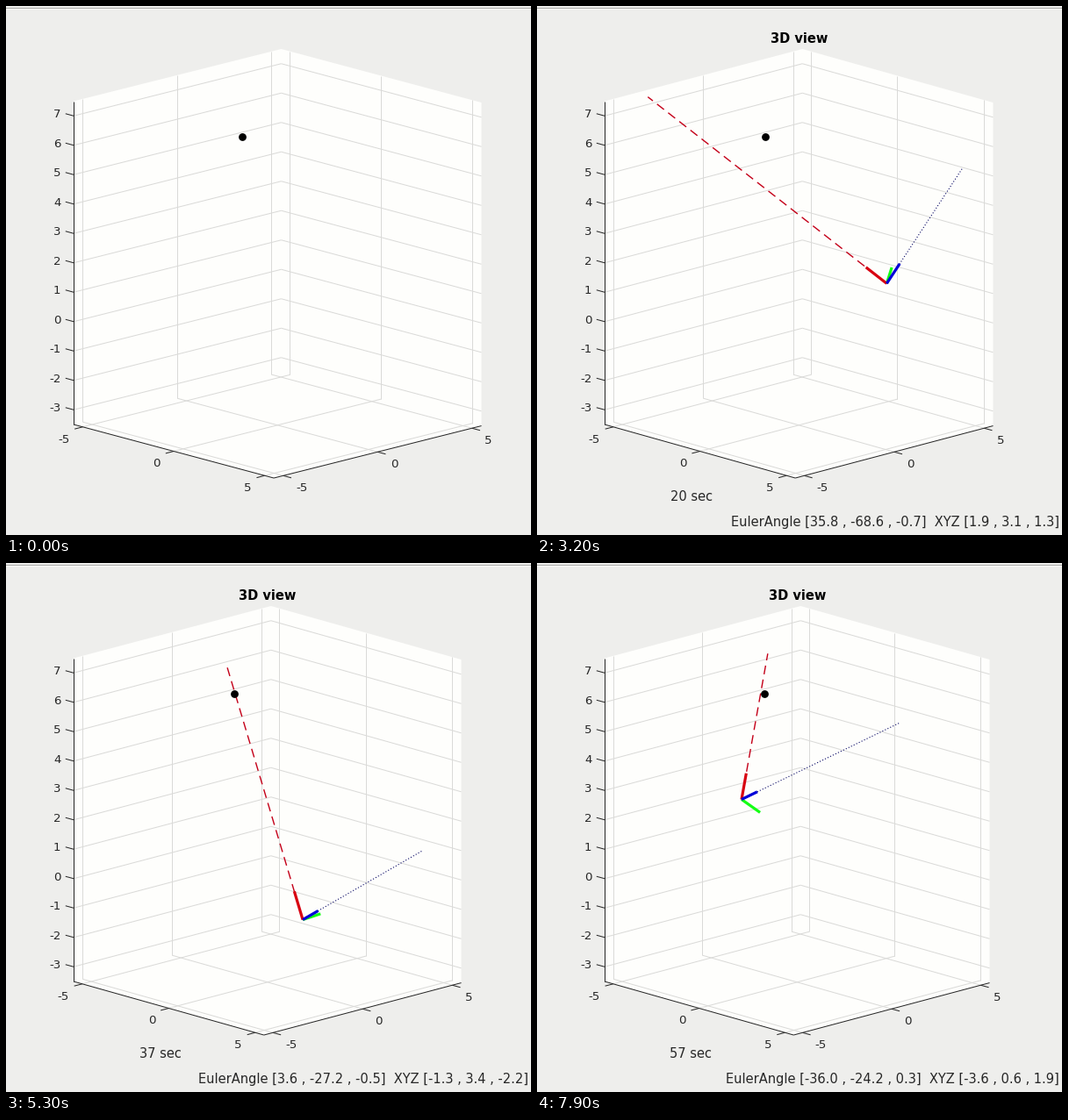
Recreate the animation shown at these times as a matplotlib script. Size 598x603 px, loop 8 s.

```python
import numpy as np
import matplotlib.pyplot as plt
from matplotlib.animation import FuncAnimation
from matplotlib.collections import LineCollection

W, H, DPI = 598, 603, 64
PT = 72 / DPI                      # points per pixel
TICKS, INTERVAL = 80, 100
LO = np.array([-5.5, -5.5, -3.5])
HI = np.array([5.5, 5.5, 7.5])
LEFT, WIDE = 77, 464.5             # box edge, and its width while no text shows
INK = "#262626"
TARGET = (0, -1.85, 6.6)

# simulated seconds against ticks: the clock slows down and catches up
CLOCK = ((6, 0), (8, 1), (14, 7), (32, 20), (34, 20.9), (43, 28), (53, 37),
         (59, 40), (62, 41), (71, 49), (79, 57))

# attitude in degrees at a few moments
MOMENTS = (0, 4, 19, 20, 27, 36, 48, 56)
ROLL = (0, -6.8, 35.8, 31, 7.1, 3.6, -11.1, -36)
PITCH = (0, -66, -68.6, -49.5, -42.3, -27.2, -21.4, -24.2)
YAW = (0, -9.4, -.7, 9, -1.5, -.5, -.1, .3)


def position(t):
    a, b = np.radians([3.04 * t + .7, 7.58 * t - 1.6])
    return np.array([3.65 * np.cos(a), 3.65 * np.sin(a), 2.18 * np.sin(b)])


def attitude(t):
    return [np.interp(t, MOMENTS, keys) for keys in (ROLL, PITCH, YAW)]


def rotation(angles):
    (cr, cp, cy), (sr, sp, sy) = (f(np.radians(angles)) for f in (np.cos, np.sin))
    rx = np.array([[1, 0, 0], [0, cr, -sr], [0, sr, cr]])
    ry = np.array([[cp, 0, sp], [0, 1, 0], [-sp, 0, cp]])
    rz = np.array([[cy, -sy, 0], [sy, cy, 0], [0, 0, 1]])
    return rz @ ry @ rx


def clip_ray(p, d, length=20):
    """End of a ray from p, cut where it leaves the box."""
    for i in range(3):
        if abs(d[i]) > 1e-9:
            edge = HI[i] if d[i] > 0 else LO[i]
            length = min(length, (edge - p[i]) / d[i])
    return p + length * d


def second_at(tick):
    if tick < CLOCK[0][0]:
        return None
    return int(np.interp(tick, *zip(*CLOCK)) + 1e-6)


def readout(sec):
    # the text trails the drawn pose by one second
    (x, y, z), (roll, pitch, yaw) = position(sec - 1), attitude(sec - 1)
    return (f"EulerAngle [{roll:.1f} , {pitch:.1f} , {yaw:.1f}]"
            f"  XYZ [{x:.1f} , {y:.1f} , {z:.1f}]")


def box_width(text):
    """Longer text squeezes the box."""
    digits = sum(c.isdigit() for c in text) - 13
    dashes = text.count("-") - 3
    return 445.5 - 11 * (.636 * digits + .361 * dashes)


def projector(width):
    r = width / WIDE

    def project(p):
        x, y, z = np.asarray(p, float) - LO
        return np.array([LEFT + r * (20.73 * x + 21.5 * y),
                         476.5 + 5.55 * x - 5.41 * y - 33.5 * z])
    return project


fig = plt.figure(figsize=(W / DPI, H / DPI), dpi=DPI, facecolor="#eeeeec")
ax = fig.add_axes([0, 0, 1, 1])


def label(x, y, s, size=13.33, ha="left", weight="normal", color=INK):
    ax.text(x, y, s, fontsize=size * PT, ha=ha, va="baseline", weight=weight,
            color=color, family="DejaVu Sans", zorder=6)


def line(a, b, color, width, **kw):
    ax.plot([a[0], b[0]], [a[1], b[1]], color=color, lw=width * PT, **kw)


def segments(pairs, color, zorder):
    """One-pixel lines; upright ones sit on whole pixels."""
    pairs = np.array(pairs)
    upright = abs(pairs[:, 0, 0] - pairs[:, 1, 0]) < .01
    pairs[upright, :, 0] = np.floor(pairs[upright, :, 0] + 1e-6)
    ax.add_collection(LineCollection(pairs, colors=color, linewidths=PT, zorder=zorder))


def draw_box(project):
    lo, hi, bot, top = -5.5, 5.5, -3.5, 7.5
    hexagon = [(lo, lo, bot), (hi, lo, bot), (hi, hi, bot),
               (hi, hi, top), (lo, hi, top), (lo, lo, top)]
    ax.fill(*np.array([project(p) for p in hexagon]).T, color="#fefefc", lw=0)

    grid = []
    for v in (-5, 0, 5):
        grid += [((v, lo, bot), (v, hi, bot)), ((v, hi, bot), (v, hi, top)),
                 ((lo, v, bot), (hi, v, bot)), ((lo, v, bot), (lo, v, top))]
    for v in range(-3, 8):
        grid += [((lo, lo, v), (lo, hi, v)), ((lo, hi, v), (hi, hi, v))]
    segments([[project(a), project(b)] for a, b in grid], "#dadad8", 2)

    along_x, against_y = np.array([9.2, 2.5]), np.array([-9.2, 2.4])
    corners = [project(hexagon[i]) for i in (5, 0, 1, 2)]
    rules = [list(pair) for pair in zip(corners, corners[1:])]
    for v in range(-3, 8):
        p = project((lo, lo, v))
        end = p - along_x
        rules.append([p, end])
        label(62.5, end[1] + 4.6, str(v), ha="right")
    for v in (-5, 0, 5):
        p, q = project((v, lo, bot)), project((hi, v, bot))
        rules += [[p, p + against_y], [q, q + along_x]]
        label(p[0] - 15, p[1] + 17.8, str(v), ha="right")
        label(q[0] + 14.4, q[1] + 17.8, str(v))
    segments(rules, INK, 3)


def draw_body(project, sec):
    p = position(sec)
    o = project(p)
    fwd, side, up = rotation(attitude(sec)).T
    line(o, project(clip_ray(p, up)), "#c40018", 1.4, zorder=4,
         dashes=(7.2, 4.3), dash_capstyle="butt")
    line(o, project(clip_ray(p, fwd)), "#000060", 1.1, zorder=4,
         dashes=(1, 2), dash_capstyle="butt")
    for axis, color in ((side, "#14ff14"), (up, "#d80010"), (fwd, "#0000d8")):
        line(o, project(p + axis), color, 3.2, zorder=5, solid_capstyle="butt")


def update(tick):
    ax.clear()
    ax.set(xlim=(0, W), ylim=(H - .5, -.5))
    ax.axis("off")
    for row, color in ((2, "#a8a8a6"), (3, "#fafaf8")):
        ax.fill([0, W, W, 0], [row - .5, row - .5, row + .5, row + .5], color=color, lw=0)

    sec = second_at(tick)
    width = WIDE
    if sec:
        text = readout(sec)
        width = box_width(text)
        label(LEFT + width / 2, 42, "3D view", 14.67, "center", "bold", "black")
        label(201.5 + .4 * (width - 445.5), 563, f"{sec} sec", 14.67, "right")
        label(595, 593, text, 14.67, "right")
    project = projector(width)
    draw_box(project)
    if sec is not None:
        draw_body(project, sec)
    ax.plot(*project(TARGET), "o", color="black", ms=8.8 * PT, mew=0, zorder=6)
    return []


anim = FuncAnimation(fig, update, frames=TICKS, interval=INTERVAL,
                     init_func=lambda: update(0), repeat=True, repeat_delay=0)
plt.show()
```
